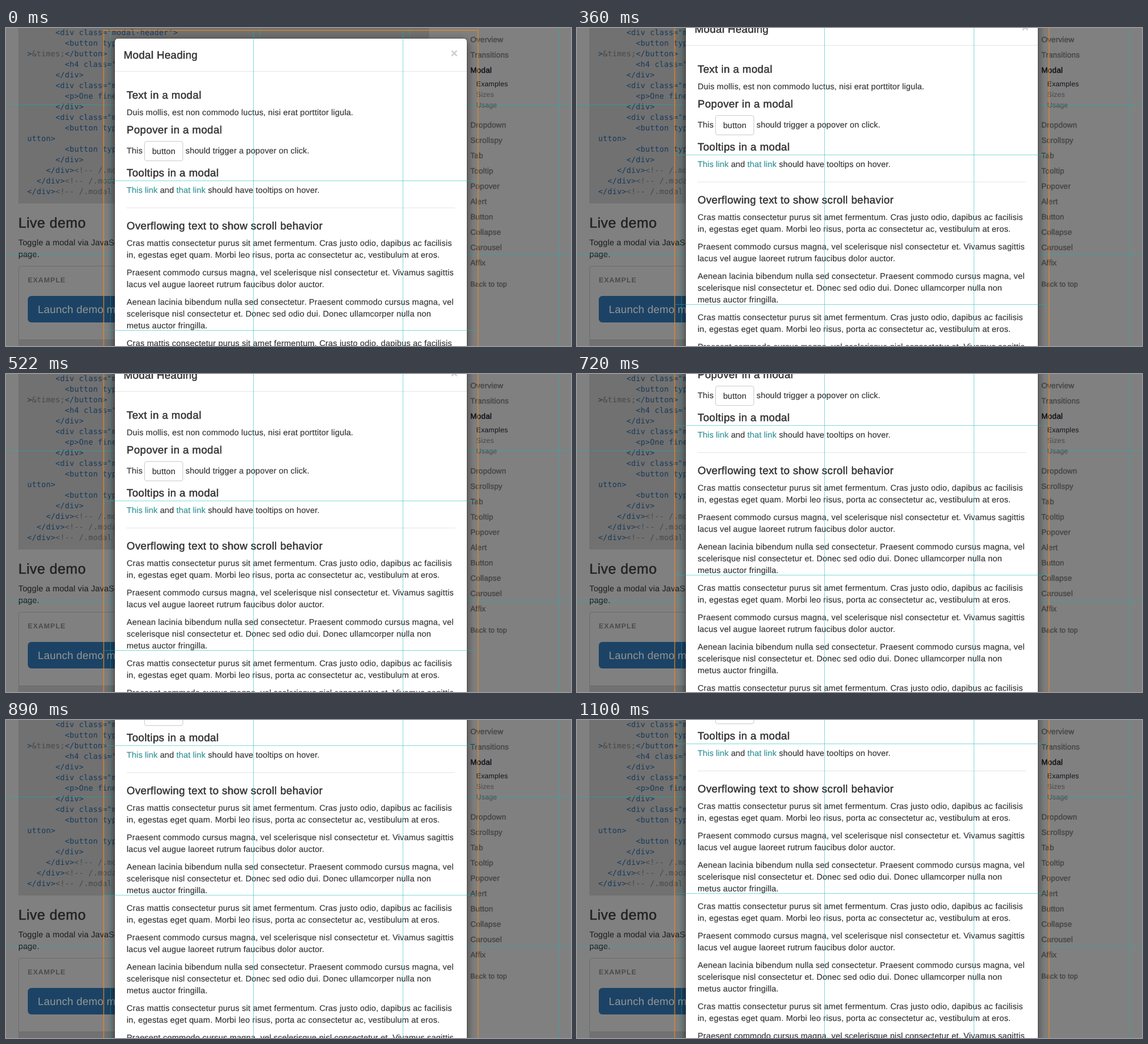
Write an HTML page that moves like this. It is 960 px wide and 540 px high and loops after 1.18 s.

```html
<!DOCTYPE html>
<html lang="en">
<head>
<meta charset="utf-8">
<title>Scrolling modal</title>
<style>
:root { --cyan: rgba(10, 184, 180, .5); }
* { box-sizing: border-box; margin: 0; padding: 0; }
html, body { width: 100%; height: 100%; overflow: hidden; }
body {
  position: relative; background: #808080; color: #333;
  font: 14px/20px "Liberation Sans", Arial, sans-serif;
  letter-spacing: .145px; white-space: nowrap; text-rendering: geometricPrecision;
}
.page, .page > *, .modal, .frame, .close, .line, .side > * { position: absolute; }
.page { inset: 0; color: #1a1a1a; }
h3, h4, h5, .side b { font-weight: 400; -webkit-text-stroke: .5px currentColor; }

.code {
  left: 21px; top: 0; width: 698px; height: 298px; padding-left: 15px;
  background: #717171; color: #17395a; white-space: pre;
  font: 13px/18px "DejaVu Sans Mono", monospace; letter-spacing: .174px;
}
.code i { font-style: normal; color: #484848; }
h3 { left: 21px; top: 317px; font-size: 24px; line-height: 30px; letter-spacing: .45px; color: #222; }
.intro { left: 21px; top: 354px; }
.example { left: 21px; top: 404px; width: 698px; height: 126px; border: 1px solid #6c6c6c; border-radius: 4px 4px 0 0; }
.label { left: 37px; top: 418px; font-size: 12px; font-weight: 700; letter-spacing: .9px; color: #4b4b4b; }
.launch {
  left: 37px; top: 455px; width: 190px; height: 45px; padding-left: 17px; border-radius: 6px;
  background: #1c4365; color: #969696; font-size: 18px; line-height: 46px; letter-spacing: .25px;
}
.more { left: 21px; top: 530px; width: 698px; height: 10px; background: #717171; }

.side { left: 789px; top: 0; font-size: 13px; color: #484848; }
.side b { letter-spacing: .2px; }
.side .sub, .side .back { font-size: 12px; }
.side .sub { left: 10px; }
.side .on { color: #14141c; }

.guides { inset: 0; }
.line { background: var(--cyan); }
.line.h { left: 0; right: 0; height: 1px; }
.line.v { top: 0; bottom: 0; width: 1px; }

.scroll { position: absolute; left: 0; top: 0; width: 960px; height: 900px; animation: scroll 1180ms step-end infinite; }
.scroll .h { left: 167px; right: 159px; }
.scroll .v { top: 5px; }
@keyframes scroll {
  0% { transform: translateY(0); }
  30.508% { transform: translateY(-44px); }
  53.39% { transform: translateY(-116px); }
  61.017% { transform: translateY(-172px); }
  75.424% { transform: translateY(-216px); }
  83.051%, 100% { transform: translateY(-219px); }
}
.modal {
  left: 184px; top: 17px; width: 600px; height: 870px; border-radius: 6px;
  background: #fff; background-clip: padding-box; border: 1px solid rgba(0, 0, 0, .2);
  box-shadow: 0 5px 15px rgba(0, 0, 0, .5);
}
h4 { height: 56px; padding-left: 15px; border-bottom: 1px solid #e5e5e5; font-size: 18px; line-height: 56px; letter-spacing: .35px; }
.close { right: 15px; top: 15px; font-size: 21px; font-weight: 700; line-height: 21px; color: #ccc; }
.text { padding: 30px 20px 0; -webkit-text-stroke: .15px currentColor; }
.lorem { letter-spacing: .2px; }
h5 { margin-bottom: 9px; font-size: 18px; letter-spacing: .4px; }
p { margin-bottom: 10px; }
.row { height: 34px; line-height: 33px; }
.btn {
  display: inline-block; width: 66px; height: 34px; margin-left: -1px;
  border: 1px solid #ccc; border-radius: 4px;
  line-height: 33px; text-align: center; vertical-align: top;
}
.link { color: #2d9095; }
hr { height: 1px; margin: 20px 0; border: 0; background: #e5e5e5; }
.frame { left: 165px; top: 3px; width: 638px; height: 897px; border: 2px solid rgba(240, 135, 25, .58); }
</style>
</head>
<body>
<div class="page">
  <div class="code">      &lt;div class="modal-header"&gt;
        &lt;button type="button" class="close"
&gt;<i>&amp;times;</i>&lt;/button&gt;
        &lt;h4 class="modal-title"&gt;
      &lt;/div&gt;
      &lt;div class="modal-body"&gt;
        &lt;p&gt;One fine body&lt;/p&gt;
      &lt;/div&gt;
      &lt;div class="modal-footer"&gt;
        &lt;button type="button" class="btn"
utton&gt;
        &lt;button type="button" class="btn"
      &lt;/div&gt;
    &lt;/div&gt;<i>&lt;!-- /.modal-content --&gt;</i>
  &lt;/div&gt;<i>&lt;!-- /.modal-dialog --&gt;</i>
&lt;/div&gt;<i>&lt;!-- /.modal --&gt;</i></div>
  <h3>Live demo</h3>
  <div class="intro">Toggle a modal via JavaScript<br>page.</div>
  <div class="example"></div>
  <div class="label">EXAMPLE</div>
  <div class="launch">Launch demo modal</div>
  <div class="more"></div>
  <div class="side"></div>
  <div class="guides">
    <i class="line h" style="top:130px"></i><i class="line h" style="top:384px"></i>
    <i class="line v" style="left:177px"></i><i class="line v" style="left:431px"></i>
    <i class="line v" style="left:685px"></i><i class="line v" style="left:939px"></i>
  </div>
</div>

<div class="scroll">
  <div class="frame"></div>
  <div class="modal">
    <h4>Modal Heading</h4>
    <div class="close">×</div>
    <div class="text">
      <h5>Text in a modal</h5>
      <p>Duis mollis, est non commodo luctus, nisi erat porttitor ligula.</p>
      <h5>Popover in a modal</h5>
      <p class="row">This <span class="btn">button</span> should trigger a popover on click.</p>
      <h5>Tooltips in a modal</h5>
      <p><span class="link">This link</span> and <span class="link">that link</span> should have tooltips on hover.</p>
      <hr>
      <h5>Overflowing text to show scroll behavior</h5>
      <div class="lorem">
        <p>Cras mattis consectetur purus sit amet fermentum. Cras justo odio, dapibus ac facilisis<br>in, egestas eget quam. Morbi leo risus, porta ac consectetur ac, vestibulum at eros.</p>
        <p>Praesent commodo cursus magna, vel scelerisque nisl consectetur et. Vivamus sagittis<br>lacus vel augue laoreet rutrum faucibus dolor auctor.</p>
        <p>Aenean lacinia bibendum nulla sed consectetur. Praesent commodo cursus magna, vel<br>scelerisque nisl consectetur et. Donec sed odio dui. Donec ullamcorper nulla non<br>metus auctor fringilla.</p>
      </div>
    </div>
  </div>
  <i class="line h" style="top:259px"></i><i class="line h" style="top:513px"></i>
  <i class="line v" style="left:420px"></i><i class="line v" style="left:674px"></i>
</div>

<script>
const side = document.querySelector('.side');
function addItem(text, y, cls = '', tag = 'b') {
  const el = document.createElement(tag);
  el.textContent = text;
  el.className = cls;
  el.style.top = y - 10 + 'px';
  side.append(el);
}
['Overview', 'Transitions', 'Modal'].forEach((t, i) => addItem(t, 20 + 26 * i, t === 'Modal' ? 'on' : ''));
['Examples', 'Sizes', 'Usage'].forEach((t, i) => addItem(t, 95 + 18 * i, i ? 'sub' : 'sub on', 'span'));
['Dropdown', 'Scrollspy', 'Tab', 'Tooltip', 'Popover', 'Alert', 'Button', 'Collapse', 'Carousel', 'Affix']
  .forEach((t, i) => addItem(t, 165 + 26 * i));
addItem('Back to top', 435, 'back');

const lorem = document.querySelector('.lorem');
for (let i = 0; i < 2; i++) lorem.after(lorem.cloneNode(true));
</script>
</body>
</html>
```
